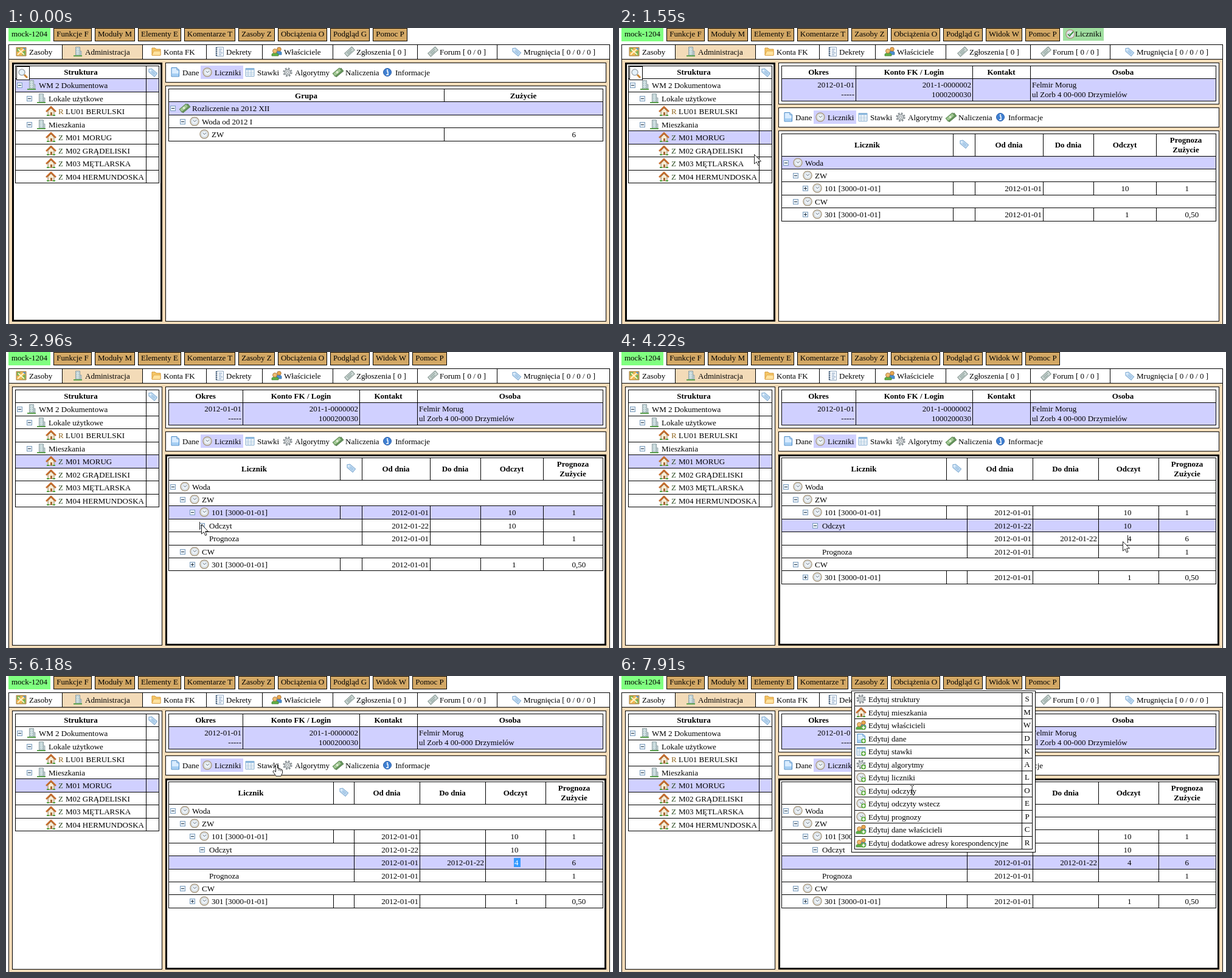
Animation, 998 px wide and 488 px high, one loop 7.99 s. Source, as an HTML page:

```html
<!DOCTYPE html>
<html lang="pl">
<head>
<meta charset="utf-8">
<style>
html, body { margin: 0; width: 100%; height: 100%; overflow: hidden; background: #fff; }
svg { display: block; }
text { font: 13px "Liberation Serif", "Times New Roman", serif; white-space: pre; }
.b { font-weight: bold; }
.m { text-anchor: middle; }
.e { text-anchor: end; }
#view rect { shape-rendering: crispEdges; }
</style>
</head>
<body>
<svg width="998" height="488" viewBox="0 0 998 488">
<defs>
  <g id="map"><path d="M-8-7H8V7H-8Z" fill="#f0b552" stroke="#a08048"/><path d="M-7-6H-1L-4 0H-7ZM1 1 7-2V6H2Z" fill="#77b255"/><path d="M-6 5 5-5M-5-4 5 5" stroke="#fff4c8" stroke-width="2"/><path d="M2-6H7V-2Z" fill="#5793ca"/></g>
  <g id="building"><path d="M-3.500-7.500H3.500V6H-3.500Z" fill="#dce9ea" stroke="#86979b"/><path d="M-1.500-6V5M1.500-6V5" stroke="#6f929b" stroke-dasharray="1.500 1.500"/><path d="M3.500-1H6V6H3.500Z" fill="#c1d2d4" stroke="#86979b" stroke-width=".7"/><path d="M-7 7H7" stroke="#5ca34f" stroke-width="2"/></g>
  <g id="folder"><path d="M-7 6V-6H-2L0-4H7V6Z" fill="#f5c667" stroke="#d49735"/><path d="M-4-1H7V6H-7Z" fill="#ffe3a0" stroke="#dda145" stroke-width=".8"/></g>
  <g id="list"><path d="M-5.500-7.500H6.500V7.500H-5.500Z" fill="#f4f8fc" stroke="#93a9c0"/><path d="M-5-7V7" stroke="#53687f" stroke-width="2.500" stroke-dasharray="2 1"/><path d="M-1-4H4M-1-1H3M-1 2H5M-1 5H3" stroke="#6e8db2"/></g>
  <g id="people"><path d="M0 3V0Q4-3 8 1V5H1Z" fill="#4b8fd0" stroke="#2f669c" stroke-width=".7"/><circle cx="4" cy="-4" r="3.300" fill="#e9a94e" stroke="#976332" stroke-width=".8"/><path d="M-8 7V4Q-3-1 3 4V7Z" fill="#5fae45" stroke="#3e7a2d" stroke-width=".7"/><circle cx="-3" cy="-1" r="3.500" fill="#f0bd70" stroke="#a16a32" stroke-width=".8"/></g>
  <g id="ticket"><g transform="rotate(-42)"><path d="M-8-3.500H8V3.500H-8Z" fill="#cbd6d3" stroke="#82938e"/><path d="M-5-1H5M-5 1.500H3" stroke="#849b94"/></g></g>
  <g id="tag"><g transform="rotate(40)"><path d="M-8 0-5-3.500H7V3.500H-5Z" fill="#c6dff5" stroke="#86aed3"/><path d="M-2-1H5M-2 1H5" stroke="#76a6d0" stroke-width=".8"/><circle cx="-5" r="1" fill="#fff"/></g></g>
  <g id="house"><path d="M-5 0V7H5V0L0-5Z" fill="#f7ecd5" stroke="#8c7958"/><path d="M-8 1 0-7 8 1" fill="none" stroke="#c66d2e" stroke-width="2.500"/><path d="M-1 7V2H2V7" fill="#a66b36"/><path d="M-7 7H-3M3 7H7" stroke="#4fa33d" stroke-width="2"/></g>
  <g id="clock"><circle r="7" fill="#f5f8fb" stroke="#a99b83" stroke-width="1.500"/><circle r="5" fill="#edf3f8" stroke="#c3ccd3"/><path d="M-2-2 0 .500 3-2" fill="none" stroke="#6d7681"/></g>
  <g id="page"><path d="M-6-7.500H3L6.500-4V7H-6Z" fill="#d9ecff" stroke="#4285c4"/><path d="M-5 2H6V6H-5Z" fill="#a6cff4"/><path d="M3-7V-4H6" fill="#fff" stroke="#4285c4"/></g>
  <g id="sheet"><path d="M-7-6.500H7V6.500H-7Z" fill="#fff" stroke="#7ea8cd"/><path d="M-7-5H7" stroke="#8db9df" stroke-width="3"/><path d="M-7 0H7M-7 3H7M-3-4V6M2-4V6" stroke="#a2c1da"/></g>
  <g id="gear"><circle r="6.200" fill="none" stroke="#8d9498" stroke-width="3" stroke-dasharray="2.700 2.170"/><circle r="4.500" fill="#e1e5e6" stroke="#969da0" stroke-width="1.500"/><circle r="1.800" fill="#fff" stroke="#8d9498"/></g>
  <g id="cash"><g transform="rotate(-40)"><path d="M-7-2H8V4H-7Z" fill="#71a966" stroke="#52764b"/><path d="M-8-4H6V2H-8Z" fill="#a1c894" stroke="#5b8751"/><circle cx="-1" cy="-1" r="2" fill="#dcebcf"/></g></g>
  <g id="info"><circle r="6.500" fill="#3f80d2" stroke="#2a5da7"/><path d="M-1-1H1V4M-2 4H2" stroke="#fff" fill="none" stroke-width="1.500"/><circle cy="-3.500" r="1.200" fill="#fff"/></g>
  <g id="lens"><path d="M2 2 7 7" stroke="#c88434" stroke-width="3"/><circle cx="-2" cy="-2" r="5" fill="#e6f2fa" stroke="#a1aab0" stroke-width="1.500"/></g>
  <g id="plus"><circle cx="4" cy="4" r="4" fill="#63ae46"/><path d="M4 1.500V6.500M1.500 4H6.500" stroke="#fff" stroke-width="1.500"/></g>
  <g id="arrow"><path d="M.5.500V16L4.200 12.700 6.700 18.500 9 17.500 6.700 11.800H11.500Z" fill="#fff" stroke="#222"/></g>
  <g id="hand"><path d="M-1.500 13V1Q0-1 1.500 1V7L4 7.500 7 8.500 9.500 10V15L7 20H-1L-6 13Q-6 9-1.500 13ZM4 8V11M7 9V12" fill="#fff" stroke="#222"/></g>
  <g id="beam"><path d="M-3-7.500H-1L0-6.500 1-7.500H3M0-6.500V6.500M-3 7.500H-1L0 6.500 1 7.500H3" fill="none" stroke="#222"/></g>
</defs>
<g id="view"></g>
<g id="pointer"></g>
</svg>
<script>
const LOOP = 7990, ROW = 21.5, METER_ROW = 21.42;
const SEL = '#d0d0ff', TAN = '#f3dbb8', BUTTON = '#d3a865';

const rect = (x, y, w, h, fill) => `<rect x="${x}" y="${y}" width="${w}" height="${h}" fill="${fill}"/>`;
const text = (x, y, s, cls = '', fill = '#000') =>
  `<text x="${x}" y="${y}" class="${cls}" fill="${fill}">${s}</text>`;
const icon = (id, x, y) => `<use href="#${id}" x="${x}" y="${y}"/>`;
const panel = (x, y, w, h, line = 1) =>
  rect(x, y, w, h, '#000') + rect(x + line, y + line, w - 2 * line, h - 2 * line, '#fff');
const base = y => Math.round(y + 15.5);

// One bordered table row; xs are the vertical lines.
function row(y, h, xs, fill = '#fff') {
  const top = Math.floor(y), height = Math.floor(y + h) - top;
  let s = rect(xs[0], top, xs.at(-1) - xs[0] + 1, height + 1, '#000');
  for (let i = 1; i < xs.length; i++)
    s += rect(xs[i - 1] + 1, top + 1, xs[i] - xs[i - 1] - 1, height - 1, fill);
  return s;
}

function heads(xs, y, labels) {
  return labels.map((s, i) => text((xs[i] + xs[i + 1]) / 2, y, s, 'b m')).join('');
}

// Tree cell: optional fold box, optional icon, label.
function tree(x, y, level, sign, pic, label) {
  x += level * 16;
  const cy = Math.floor(y) + 11;
  let s = '';
  if (sign) {
    s += panel(x - 4, cy - 4, 9, 9).replace('#000', '#7c9dbd').replace('#fff', '#e9f1f8')
      + rect(x - 2, cy, 5, 1, '#234');
    if (sign === '+') s += rect(x, cy - 2, 1, 5, '#234');
  }
  if (pic) s += icon(pic, x + 20, cy);
  return s + text(x + (pic ? 32 : 12), base(y), label);
}

function buttons(t) {
  const full = t < 1090 || t >= 1240;
  const items = [['Funkcje F', 63], ['Moduły M', 66], ['Elementy E', 71], full && ['Komentarze T', 84],
    ['Zasoby Z', 60], ['Obciążenia O', 81], ['Podgląd G', 65], t >= 1090 && ['Widok W', 60], ['Pomoc P', 57]];
  let x = 78, s = rect(4, 0, 69, 22, '#80ff80') + text(38.5, 14, 'mock-1204', 'm');
  for (const [label, w] of items.filter(Boolean)) {
    s += rect(x, 0, w, 22, '#000') + rect(x + 1, 1, w - 2, 20, BUTTON) + text(x + w / 2, 14, label, 'm');
    x += w + 5;
  }
  if (t >= 1240 && t < 2800)
    s += rect(730, 0, 67, 21, '#a0dfa0') + icon('clock', 742, 10)
      + '<path d="M738 10 741 13 747 6" fill="none" stroke="#3c9a3c" stroke-width="2"/>' + text(750, 14, 'Liczniki');
  return s;
}

function tabs() {
  const xs = [4, 92, 224, 329, 421, 537, 676, 807, 992];
  const items = [['map', 25, 'Zasoby', 38], ['building', 118, 'Administracja', 130], ['folder', 247, 'Konta FK', 259],
    ['list', 351, 'Dekrety', 362], ['people', 445, 'Właściciele', 457], ['ticket', 565, 'Zgłoszenia [ 0 ]', 576],
    ['ticket', 702, 'Forum [ 0 / 0 ]', 713], ['tag', 839, 'Mrugnięcia [ 0 / 0 / 0 ]', 851]];
  return rect(4, 27, 989, 461, '#000') + rect(5, 28, 987, 460, TAN) + row(27, 24, xs)
    + rect(93, 28, 131, 23, TAN)
    + items.map(([pic, ix, label, x]) => icon(pic, ix, 39) + text(x, 44, label)).join('');
}

function structure(t) {
  const xs = [15, 230, 251], focus = t < 2090, chosen = t < 1240 ? 0 : 4;
  const rows = [[0, 'WM 2 Dokumentowa'], [1, 'Lokale użytkowe'], [2, 'LU01 BERULSKI', 'R'], [1, 'Mieszkania'],
    [2, 'M01 MORUG', 'Z'], [2, 'M02 GRĄDELISKI', 'Z'], [2, 'M03 MĘTLARSKA', 'Z'], [2, 'M04 HERMUNDOSKA', 'Z']];
  let s = panel(10, 57, 247, 427, focus ? 3 : 1) + row(62, ROW, xs)
    + text(123, 77, 'Struktura', 'b m') + icon('tag', 241, 73);
  rows.forEach(([level, label, mark], i) => {
    const y = 62 + ROW * (i + 1);
    const hover = i === 4 && t >= 1090 && t < 1240;
    s += row(y, ROW, xs, i === chosen ? SEL : hover ? '#d0d0d0' : '#fff')
      + tree(22, y, level, mark ? '' : '-', mark ? 'house' : 'building', mark ? '' : label);
    if (mark) s += text(86, base(y), mark, '', mark === 'R' ? '#8f651c' : '#2b4a20') + text(98, base(y), label);
  });
  return focus ? s + panel(17, 63, 22, 23) + icon('lens', 28, 75) : s;
}

function person() {
  const xs = [267, 389, 581, 676, 981];
  return panel(262, 57, 725, 69) + row(62, ROW, xs) + row(83, 37, xs, SEL)
    + heads(xs, 77, ['Okres', 'Konto FK / Login', 'Kontakt', 'Osoba'])
    + text(387, 98, '2012-01-01', 'e') + text(387, 114, '-----', 'e')
    + text(579, 98, '201-1-0000002', 'e') + text(579, 114, '1000200030', 'e')
    + text(679, 98, 'Felmir Morug') + text(679, 114, 'ul Zorb 4 00-000 Drzymielów');
}

function toolbar(y) {
  const items = [['page', 278, 'Dane', 290], ['clock', 331, 'Liczniki', 343], ['sheet', 401, 'Stawki', 413],
    ['gear', 463, 'Algorytmy', 475], ['cash', 546, 'Naliczenia', 558], ['info', 627, 'Informacje', 640]];
  return panel(262, y, 725, 33) + rect(320, y + 5, 70, 22, SEL)
    + items.map(([pic, ix, label, x]) => icon(pic, ix, y + 16) + text(x, y + 21, label)).join('');
}

function groups(y) {
  const xs = [267, 720, 981], span = [267, 981];
  const at = i => y + ROW * i;
  return row(y, ROW, xs) + heads(xs, base(y), ['Grupa', 'Zużycie'])
    + row(at(1), ROW, span, SEL) + tree(274, at(1), 0, '-', 'cash', 'Rozliczenie na 2012 XII')
    + row(at(2), ROW, span) + tree(274, at(2), 1, '-', 'clock', 'Woda od 2012 I')
    + row(at(3), ROW, xs) + tree(274, at(3), 2, '', 'clock', 'ZW') + text(937, base(at(3)), '6', 'e');
}

function meters(t) {
  const open = t >= 2330, deep = t >= 3040;
  const xs = deep ? [267, 538, 572, 680, 788, 887, 981] : [267, 549, 585, 697, 780, 883, 981];
  const joined = [xs[0], ...xs.slice(2)];
  const readEnd = deep ? 842.5 : 838.5;
  const chosen = t < 2330 ? 'Woda' : t < 3040 ? '101' : t < 4300 ? 'Odczyt' : 'sub';
  const marked = t >= 5080 && t < 6890;
  // key, level, fold sign, icon, label, [from, to, reading, usage]
  const rows = [
    ['Woda', 0, '-', 'clock', 'Woda'],
    ['ZW', 1, '-', 'clock', 'ZW'],
    ['101', 2, open ? '-' : '+', 'clock', '101 [3000-01-01]', ['2012-01-01', '', '10', '1']],
    open && ['Odczyt', 3, deep ? '-' : '+', '', 'Odczyt', ['2012-01-22', '', '10', '']],
    deep && ['sub', 3, '', '', '', ['2012-01-01', '2012-01-22', '4', '6']],
    open && ['Prognoza', 3, '', '', 'Prognoza', ['2012-01-01', '', '', '1']],
    ['CW', 1, '-', 'clock', 'CW'],
    ['301', 2, '+', 'clock', '301 [3000-01-01]', ['2012-01-01', '', '1', '0,50']]
  ].filter(Boolean);
  let s = row(174, 37, xs) + heads(xs, 197, ['Licznik', '', 'Od dnia', 'Do dnia', 'Odczyt'])
    + icon('tag', (xs[1] + xs[2]) / 2, 191)
    + text((xs[5] + xs[6]) / 2, 189, 'Prognoza', 'b m') + text((xs[5] + xs[6]) / 2, 205, 'Zużycie', 'b m');
  rows.forEach(([key, level, sign, pic, label, cells], i) => {
    const y = 211 + METER_ROW * i, by = base(y);
    const lines = !cells ? [267, 981] : level === 2 ? xs : joined;
    s += row(y, METER_ROW, lines, key === chosen ? SEL : '#fff') + tree(274, y, level, sign, pic, label);
    if (!cells) return;
    const [from, to, reading, usage] = cells;
    const picked = key === 'sub' && marked;
    if (picked) s += rect(835, 300, 11, 15, '#3399ff');
    s += text(xs[3] - 2, by, from, 'e') + text(xs[4] - 2, by, to, 'e')
      + text(readEnd, by, reading, 'e', picked ? '#fff' : '#000')
      + text(usage.includes(',') ? 953.2 : 937, by, usage, 'e');
  });
  return s;
}

function menu() {
  const items = [['gear', 'struktury', 'S'], ['house', 'mieszkania', 'M'], ['people', 'właścicieli', 'W'],
    ['page', 'dane', 'D'], ['sheet', 'stawki', 'K'], ['gear', 'algorytmy', 'A'], ['clock', 'liczniki', 'L'],
    ['clock', 'odczyty', 'O'], ['clock', 'odczyty wstecz', 'E'], ['clock', 'prognozy', 'P'],
    ['people', 'dane właścicieli', 'C'], ['people', 'dodatkowe adresy korespondencyjne', 'R']];
  return panel(382, 24, 303, 267) + items.map(([pic, label, key], i) => {
    const y = 27.5 + ROW * i, cy = Math.floor(y) + 11;
    return row(y, ROW, [387, 662, 679]) + icon(pic, 398, cy) + (i < 2 ? '' : icon('plus', 398, cy))
      + text(410, base(y), 'Edytuj ' + label) + text(671, base(y) - 1, key, 'm');
  }).join('');
}

function scene(t) {
  const shift = t < 1090 ? 0 : 74;
  return tabs() + buttons(t) + structure(t) + (shift ? person() : '') + toolbar(57 + shift)
    + panel(262, 95 + shift, 725, 389 - shift, t < 2090 ? 1 : 3)
    + (t < 1240 ? groups(100 + shift) : meters(t))
    + (t >= 6890 ? menu() : '');
}

const path = [[220, 805, 456], [850, 174, 176], [1240, 174, 176], [2010, 306, 263], [2330, 306, 263],
  [2650, 321, 284], [3270, 321, 284], [3980, 828, 312], [4840, 828, 312], [4930, 845, 308], [5160, 829, 306],
  [5320, 829, 306], [5480, 829, 338], [5940, 829, 338], [6180, 445, 145], [6660, 405, 8], [7360, 405, 8],
  [7908, 482, 188]];
const clicks = [[930, 1090], [2170, 2330], [2800, 2960], [4140, 4220], [4920, 5320], [6890, 6970]];
const carets = [[1090, 1240, 174, 174], [2170, 2330, 303, 258], [2880, 3040, 318, 280], [4140, 4300, 836, 302]];
const during = t => ([from, to]) => t >= from && t < to;

function pointer(t) {
  if (t < 220) return '';
  const step = 78.45, q = 220 + Math.floor((t - 220) / step + 0.2) * step;
  let i = path.findIndex(p => p[0] > q);
  if (i < 0) i = path.length;
  const a = path[i - 1], b = path[i] || a;
  const k = (q - a[0]) / (b[0] - a[0] || 1), e = k * k * (3 - 2 * k);
  const x = Math.round(a[1] + (b[1] - a[1]) * e), y = Math.round(a[2] + (b[2] - a[2]) * e);
  const caret = carets.find(during(t));
  return (clicks.some(during(t)) ? `<circle cx="${x}" cy="${y}" r="11" fill="#ffff30" opacity=".75"/>` : '')
    + (caret ? rect(caret[2], caret[3], 1, 13, '#222') : '')
    + icon(t >= 7440 ? 'beam' : t >= 6100 ? 'hand' : 'arrow', x, y);
}

const shown = {};
function show(id, markup) {
  if (shown[id] === markup) return;
  shown[id] = markup;
  document.getElementById(id).innerHTML = markup;
}

function frame() {
  const t = performance.now() % LOOP;
  show('view', scene(t));
  show('pointer', pointer(t));
  requestAnimationFrame(frame);
}
frame();
</script>
</body>
</html>
```
